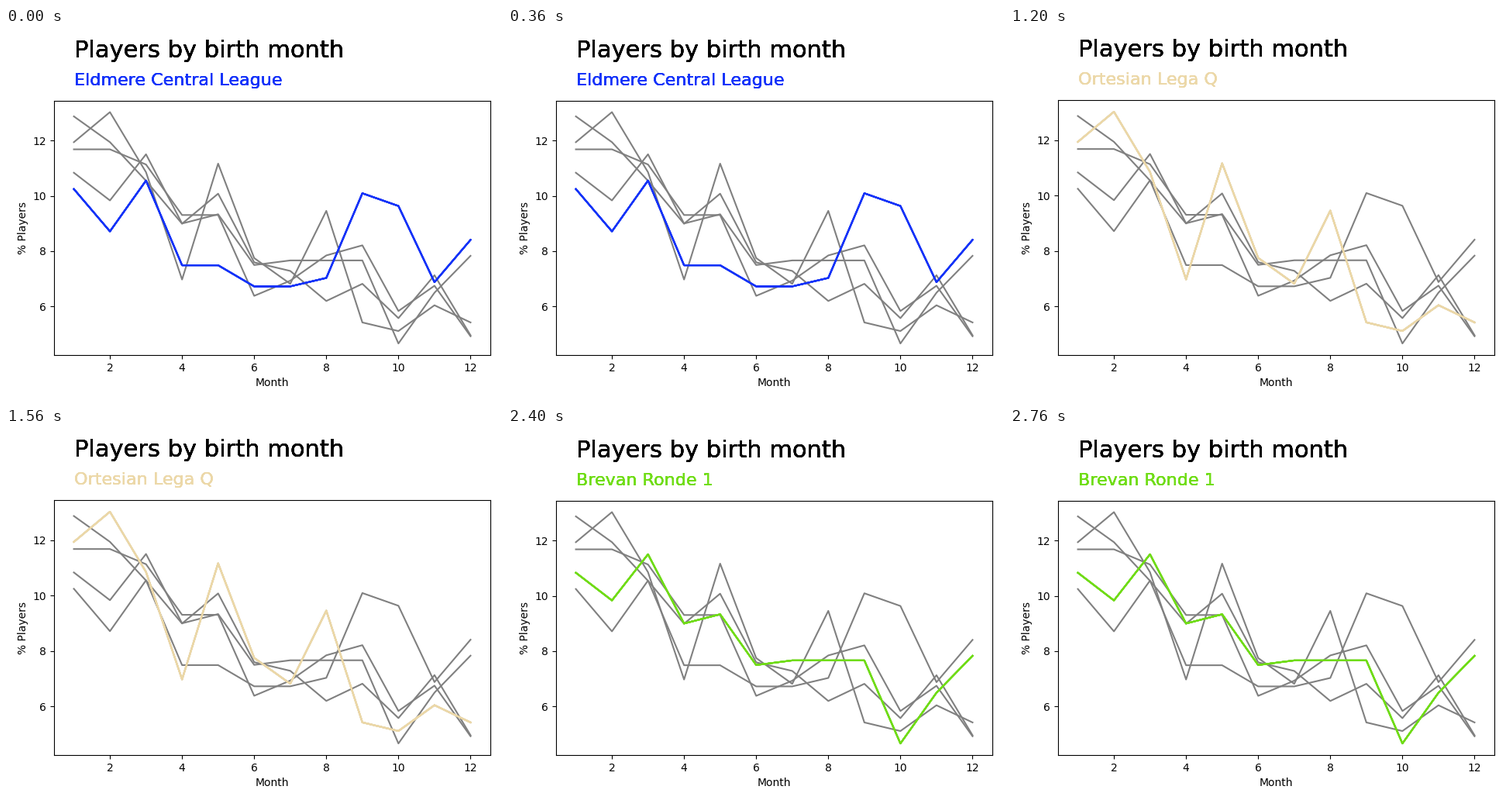
Animation, 640 px wide and 480 px high, one loop 3000 ms. Source, as a matplotlib script:

```python
import numpy as np
import matplotlib.pyplot as plt
from matplotlib.animation import FuncAnimation

W, H, DPI = 640, 480, 100
LEFT, RIGHT, BOTTOM = 62, 625, 422
LAYERS = 5  # repeated drawing gives the text and highlight their crisp edges

# name, colour, axes top in pixels, players born in each month
LEAGUES = [
    ("Eldmere Central League", "#1433fa", 93.6,
     [67, 57, 69, 49, 49, 44, 44, 46, 66, 63, 45, 55]),
    ("Velda Costera Division", "#75acba", 93.1,
     [83, 77, 68, 58, 65, 49, 47, 40, 44, 36, 46, 32]),
    ("Ortesian Lega Q", "#ecd8a8", 93.1,
     [77, 84, 70, 45, 72, 50, 44, 61, 35, 33, 39, 35]),
    ("Tolmar 1. Talgauliga", "#1a5263", 93.1,
     [64, 64, 61, 51, 51, 35, 38, 43, 45, 32, 37, 27]),
    ("Brevan Ronde 1", "#70dd16", 93.6,
     [65, 59, 69, 54, 56, 45, 46, 46, 46, 28, 39, 47]),
]

months = np.arange(1, 13)
shares = [100 * np.array(births) / sum(births) for *_, births in LEAGUES]

plt.rcParams["font.family"] = "DejaVu Sans"
fig = plt.figure(figsize=(W / DPI, H / DPI), dpi=DPI)
ax = fig.add_axes([0.1, 0.1, 0.8, 0.7])
ax.set_xlabel("Month")
ax.set_ylabel("% Players")

for share in shares:
    ax.plot(months, share, color="gray", lw=1.5)

highlights = [ax.plot(months, shares[0], lw=1.5)[0] for _ in range(LAYERS)]
subtitles = [ax.text(1, 14, "", fontsize=16) for _ in range(LAYERS)]
for _ in range(LAYERS):
    ax.text(1, 15, "Players by birth month", fontsize=22)

lo, hi = np.min(shares), np.max(shares)
pad = 0.05 * (hi - lo)
ax.set_xlim(1 - 0.55, 12 + 0.55)
ax.set_ylim(lo - pad, hi + pad)


def update(i):
    name, color, top, _ = LEAGUES[i]
    ax.set_position([LEFT / W, 1 - BOTTOM / H,
                     (RIGHT - LEFT) / W, (BOTTOM - top) / H])
    for line in highlights:
        line.set_ydata(shares[i])
        line.set_color(color)
    for label in subtitles:
        label.set_text(name)
        label.set_color(color)
    return highlights + subtitles


anim = FuncAnimation(fig, update, frames=len(LEAGUES), interval=600,
                     repeat=True, repeat_delay=0, blit=False)
plt.show()
```
